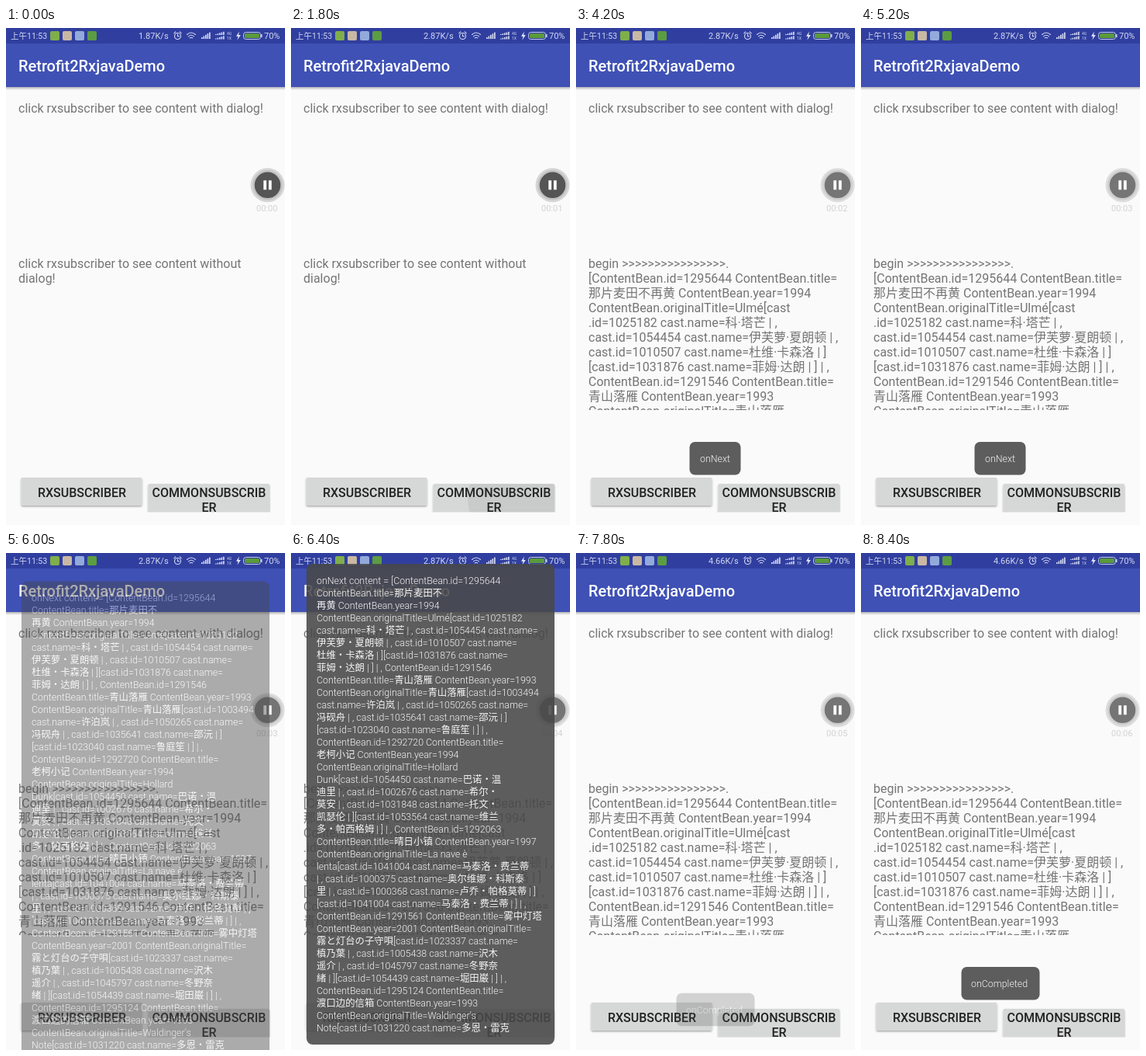
Recreate the animation shown at these times as an HTML page. Size 360 by 640 pixels, loop 8600 ms.

```html
<!DOCTYPE html>
<html lang="zh">
<head>
<meta charset="utf-8">
<style>
  html, body { margin: 0; width: 100%; height: 100%; overflow: hidden; background: #fafafa; }
  svg { display: block; width: 360px; height: 640px; }
  text { font-family: Roboto, "Noto Sans CJK SC", sans-serif; white-space: pre; }
  .status { font-size: 11px; fill: #d3d8f2; }
  .title { font-size: 20px; font-weight: 500; fill: #fff; }
  .body { font-size: 16px; fill: #757575; }
  .button { font-size: 16px; font-weight: 500; fill: #212121; text-anchor: middle; }
  .toast rect { fill: #484848; fill-opacity: .88; }
  .toast text { font-size: 12.4px; font-weight: 300; fill: #f4f4f4; }
</style>
</head>
<body>
<svg viewBox="0 0 360 640">
  <defs>
    <linearGradient id="barShadow" x2="0" y2="1">
      <stop stop-color="#000" stop-opacity=".28"/>
      <stop offset="1" stop-color="#000" stop-opacity="0"/>
    </linearGradient>
    <filter id="lift" x="-10%" y="-20%" width="120%" height="150%">
      <feDropShadow dx="0" dy="1.3" stdDeviation="1" flood-opacity=".35"/>
    </filter>
    <clipPath id="contentClip"><rect y="290" width="360" height="202"/></clipPath>
    <clipPath id="buttonClip"><rect x="180" y="580" width="164" height="43.5"/></clipPath>
    <clipPath id="rippleClip"><rect x="184" y="587" width="156" height="37" rx="2"/></clipPath>
  </defs>

  <rect width="360" height="640" fill="#fafafa"/>
  <rect width="360" height="20" fill="#303f9f"/>
  <rect y="20" width="360" height="56" fill="#3f51b5"/>
  <rect y="76" width="360" height="4" fill="url(#barShadow)"/>
  <text class="title" x="16" y="55.6">Retrofit2RxjavaDemo</text>

  <text class="status" x="6" y="14" style="font-size:10.5px">上午11:53</text>
  <rect x="57" y="4" width="12" height="12" rx="2" fill="#7fae4b"/>
  <rect x="73" y="4" width="12" height="12" rx="2" fill="#c9b8a4"/>
  <rect x="89" y="4" width="12" height="12" rx="2" fill="#92aadb"/>
  <rect x="105" y="4" width="12" height="12" rx="2" fill="#5c9c43"/>
  <text class="status" id="speed" x="171" y="14"></text>
  <g fill="none" stroke="#d3d8f2" stroke-width="1.1" stroke-linecap="round">
    <circle cx="221.5" cy="10.5" r="4"/>
    <path d="M221.5 8v2.7h2M216.8 6.8l2-2M226.2 6.8l-2-2"/>
    <path d="M233.5 8.5q5.500-5 11 0M235.5 10.8q3.500-3 7 0M237.4 12.8q1.600-1.200 3.200 0"/>
  </g>
  <g id="signal" fill="#d3d8f2"></g>
  <g class="status" style="font-size:5px"><text x="285" y="9">4G</text><text x="285" y="15">1X</text></g>
  <path d="M301 4.500l-4 6.300h2.600l-1.200 4.700 4.400-6.500h-2.800z" fill="#e6e9f8"/>
  <rect x="306.5" y="5.5" width="22" height="9" rx="3" fill="#303f9f" stroke="#c3cae8"/>
  <rect x="308" y="7" width="19" height="6" rx="1.5" fill="#5b9a3c"/>
  <rect x="329" y="8" width="1.5" height="4" fill="#c3cae8"/>
  <text class="status" x="333" y="14">70%</text>

  <text class="body" x="16" y="109">click rxsubscriber to see content with dialog!</text>
  <g class="body" id="hint"></g>
  <g class="body" id="content" clip-path="url(#contentClip)"></g>

  <rect x="19.5" y="579" width="156" height="36" rx="2" fill="#d6d7d7" filter="url(#lift)"/>
  <text class="button" x="98" y="603.5">RXSUBSCRIBER</text>
  <g clip-path="url(#buttonClip)">
    <rect x="183.5" y="587" width="156.5" height="50" rx="2" fill="#d6d7d7" filter="url(#lift)"/>
    <circle id="ripple" cx="290" cy="606" clip-path="url(#rippleClip)"/>
    <text class="button" x="262" y="603.5">COMMONSUBSCRIB</text>
    <text class="button" x="262" y="622.5">ER</text>
  </g>

  <g id="recorder">
    <circle cx="337.5" cy="202.3" r="22" fill="#d6d6d6"/>
    <circle cx="337.5" cy="202.3" r="18" fill="#555" stroke="#c2c2c2" stroke-width="2.5"/>
    <path d="M334.200 196.300v12M340.800 196.300v12" stroke="#fff" stroke-width="3.8"/>
  </g>
  <text id="timer" x="323" y="236" font-size="11" fill="#d2d2d2"></text>

  <g class="toast" id="next"><rect x="146.5" y="533" width="66" height="42.500" rx="7"/><text x="160" y="559">onNext</text></g>
  <g class="toast" id="result"><rect x="20" y="14" width="320" height="619" rx="8"/><g id="resultText"></g></g>
  <g class="toast" id="done"><rect x="129.5" y="533" width="101" height="42.500" rx="7"/><text x="142" y="559">onCompleted</text></g>
</svg>
<script>
const LOOP = 8600, STEP = 200;
const el = id => document.getElementById(id);
const clamp = v => Math.max(0, Math.min(1, v));

function add(parent, tag, attrs, text = '') {
  const node = document.createElementNS('http://www.w3.org/2000/svg', tag);
  for (const key in attrs) node.setAttribute(key, attrs[key]);
  node.textContent = text;
  parent.append(node);
}

// "@" and "#" abbreviate the two bean prefixes.
function addLines(id, x, y, leading, source) {
  source.trim().split('\n').forEach((line, i) => add(el(id), 'text', { x, y: y + i * leading },
    line.replace(/@/g, 'ContentBean.').replace(/#/g, 'cast.')));
}

addLines('hint', 16, 309, 19, `click rxsubscriber to see content without
dialog!`);

addLines('content', 16, 309, 19, `
begin >>>>>>>>>>>>>>>>.
[@id=1295644 @title=
那片麦田不再黄 @year=1994
@originalTitle=Ulmé[cast
.id=1025182 #name=科·塔芒 | ,
#id=1054454 #name=伊芙萝·夏朗顿 | ,
#id=1010507 #name=杜维·卡森洛 | ]
[#id=1031876 #name=菲姆·达朗 | ] | ,
@id=1291546 @title=
青山落雁 @year=1993
@originalTitle=青山落雁`);

addLines('resultText', 33, 39.5, 16, `
onNext content = [@id=1295644
@title=那片麦田不
再黄 @year=1994
@originalTitle=Ulmé[#id=1025182
#name=科・塔芒 | , #id=1054454 #name=
伊芙萝・夏朗顿 | , #id=1010507 #name=
杜维・卡森洛 | ][#id=1031876 #name=
菲姆・达朗 | ] | , @id=1291546
@title=青山落雁 @year=1993
@originalTitle=青山落雁[#id=1003494
#name=许泊岚 | , #id=1050265 #name=
冯砚舟 | , #id=1035641 #name=邵沅 | ]
[#id=1023040 #name=鲁庭笙 | ] | ,
@id=1292720 @title=
老柯小记 @year=1994
@originalTitle=Hollard
Dunk[#id=1054450 #name=巴诺・温
迪里 | , #id=1002676 #name=希尔・
莫安 | , #id=1031848 #name=托文・
凯瑟伦 | ][#id=1053564 #name=维兰
多・帕西格姆 | ] | , @id=1292063
@title=晴日小镇 @year=1997
@originalTitle=La nave è
lenta[#id=1041004 #name=马泰洛・费兰蒂
| , #id=1000375 #name=奥尔维娜・科斯泰
里 | , #id=1000368 #name=卢乔・帕格莫蒂 | ]
[#id=1041004 #name=马泰洛・费兰蒂 | ] | ,
@id=1291561 @title=雾中灯塔
@year=2001 @originalTitle=
霧と灯台の子守唄[#id=1023337 #name=
槙乃葉 | , #id=1005438 #name=沢木
遥介 | , #id=1045797 #name=冬野奈
緒 | ][#id=1054439 #name=堀田巌 | ] | ,
@id=1295124 @title=
渡口边的信箱 @year=1993
@originalTitle=Waldinger's
Note[#id=1031220 #name=多恩・雷克`);

for (let i = 0; i < 5; i++) {
  const h = 2 + i * 1.6;
  add(el('signal'), 'rect', { x: 252 + i * 2.5, y: 14 - h, width: 1.7, height: h });
  add(el('signal'), 'rect', { x: 270 + i * 2.5, y: 9 - h / 2, width: 1.7, height: h / 2 });
  add(el('signal'), 'rect', { x: 270 + i * 2.5, y: 14.5 - h / 2, width: 1.7, height: h / 2 });
}

const TICKS = [1200, 3800, 5000, 6200, 7200, 8200];

// Toasts fade in while rising and fade out while sinking.
function showToast(id, t, start, end) {
  const alpha = Math.min(clamp((t - start) / 400), clamp((end - t) / 400));
  el(id).setAttribute('opacity', alpha);
  el(id).setAttribute('transform', `translate(0 ${45 * (1 - alpha)})`);
}

function render(time) {
  let t = Math.floor(time % LOOP / STEP) * STEP;
  if (t > 3000 && t < 3800) t = 3000;

  el('speed').textContent = (t < 1000 ? '1.87' : t < 6800 ? '2.87' : '4.66') + 'K/s';
  el('timer').textContent = '00:0' + TICKS.filter(tick => t >= tick).length;
  el('recorder').setAttribute('opacity', 1 - 0.2 * clamp((t - 2400) / 600));

  const loaded = t >= 3800;
  el('hint').setAttribute('visibility', loaded ? 'hidden' : 'visible');
  el('content').setAttribute('visibility', loaded ? 'visible' : 'hidden');

  el('ripple').setAttribute('r', 62 * Math.max(0, t - 1400) / 400);
  el('ripple').setAttribute('opacity', 0.06 * clamp((2600 - t) / 400));

  showToast('next', t, 3600, 5800);
  showToast('result', t, 5800, 7740);
  showToast('done', t, 7700, 9200);
}

const begin = performance.now();
function loop() {
  render(performance.now() - begin);
  requestAnimationFrame(loop);
}
loop();
</script>
</body>
</html>
```
